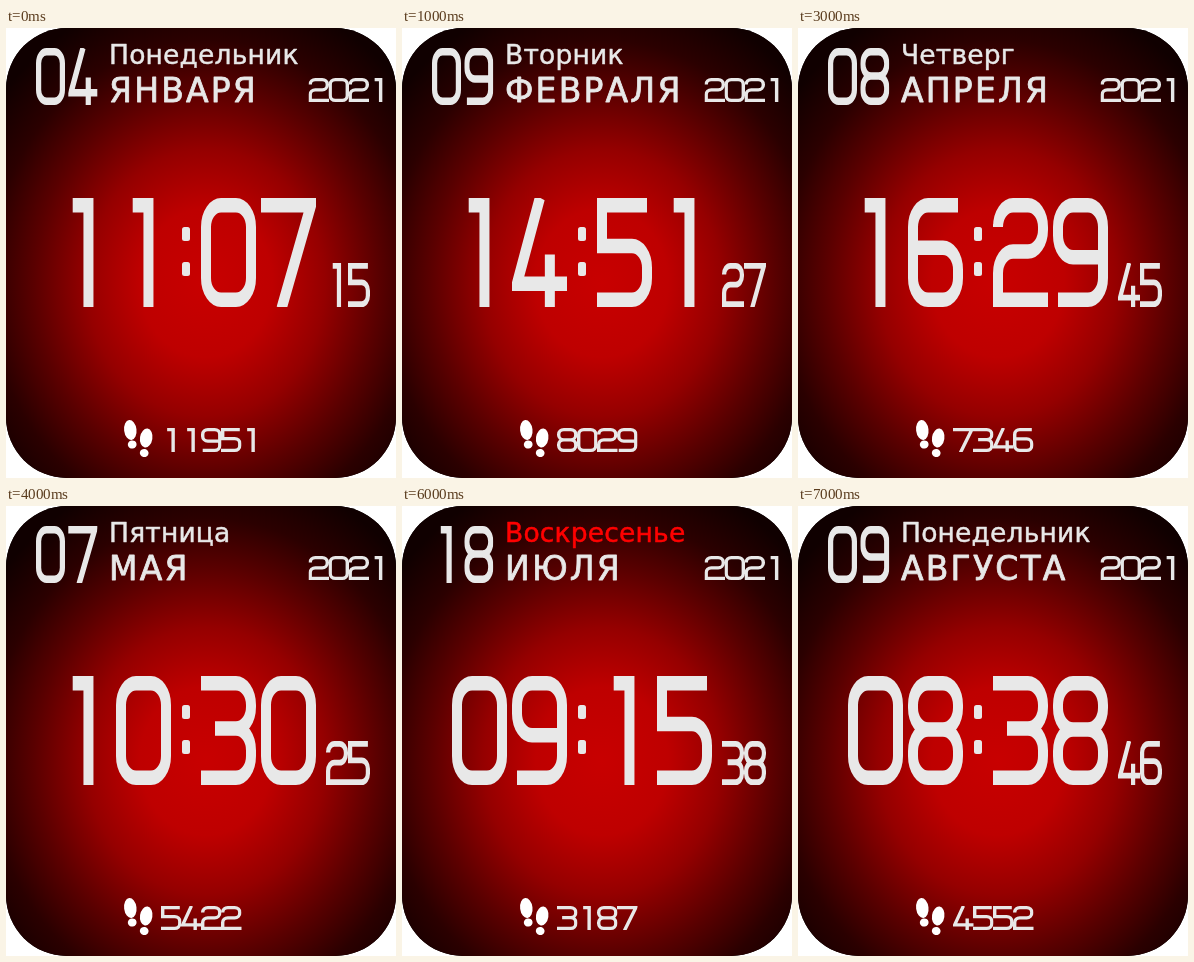
An HTML page with a canvas that plays this animation: 390x450 px, repeating every 8 s.

```html
<!DOCTYPE html>
<html lang="ru">
<head>
<meta charset="utf-8">
<style>
html, body { margin: 0; width: 390px; height: 450px; overflow: hidden; background: #fff; }
canvas { display: block; }
</style>
</head>
<body>
<canvas id="face" width="390" height="450"></canvas>
<script>
const ctx = document.getElementById('face').getContext('2d');
const INK = '#e8e8e8', RED = '#ff0000', STEP_MS = 1000;

// day, weekday, month, hours + minutes, seconds, steps
const screens = [
  ['04', 'Понедельник', 'ЯНВАРЯ', '1107', '15', '11951'],
  ['09', 'Вторник', 'ФЕВРАЛЯ', '1451', '27', '8029'],
  ['03', 'Среда', 'МАРТА', '1804', '35', '9072'],
  ['08', 'Четверг', 'АПРЕЛЯ', '1629', '45', '7346'],
  ['07', 'Пятница', 'МАЯ', '1030', '25', '5422'],
  ['12', 'Суббота', 'ИЮНЯ', '0742', '26', '6665'],
  ['18', 'Воскресенье', 'ИЮЛЯ', '0915', '38', '3187'],
  ['09', 'Понедельник', 'АВГУСТА', '0838', '46', '4552']
];

// Digit sizes; penX is the width of upright strokes, penY of level ones.
const BIG = { w: 55, h: 109, pitch: 60, penX: 10, penY: 14.5 };
const DAY = { w: 29, h: 57, pitch: 32.3, penX: 5.2, penY: 7.5 };
const SECONDS = { w: 22, h: 44, pitch: 22, penX: 4.2, penY: 5.8 };
const WIDE = { w: 20.5, h: 24, pitch: 20, penX: 3.4, penY: 3.2 };

// Unit-box strokes; an "s" after a point keeps its corner sharp.
const glyphs = {
  0: ['.5,0 1,0 1,1 0,1 0,0 .5,0'],
  1: ['.26,0 .61,0s .61,1.2'],
  2: ['0,.2 0,0 1,0 1,.49 0,.49 0,1s 1.2,1'],
  3: ['-.2,0 1,0 1,.48 .2,.48', '.2,.48 1,.48 1,1 -.2,1'],
  4: ['.51,-.08 0,.83s 1.2,.83', '.73,.52 .73,1.2'],
  5: ['1,0 0,0s 0,.43s 1,.43 1,1 -.2,1'],
  6: ['1,0 0,0 0,1 1,1 1,.45 0,.45'],
  7: ['-.2,0 1,0s .34,1.1'],
  8: ['.5,0 1,0 1,.49 0,.49 0,0 .5,0', '.5,.49 1,.49 1,1 0,1 0,.49 .5,.49'],
  9: ['0,1 1,1 1,0 0,0 0,.55 1,.55']
};

const strokes = {};
for (const key in glyphs) {
  strokes[key] = glyphs[key].map(path => path.split(' ').map(point => {
    const [u, v] = point.split(',').map(parseFloat);
    return { u, v, sharp: point.endsWith('s') };
  }));
}

function drawDigit(digit, x, y, { w, h, penX, penY }) {
  // Work in pen units, so one line of width 1 gives both stroke widths.
  const radius = Math.min(w * 0.28 / penX, h * 0.2 / penY);
  const px = p => 0.5 + p.u * (w / penX - 1);
  const py = p => 0.5 + p.v * (h / penY - 1);
  ctx.save();
  ctx.beginPath();
  ctx.rect(x, y, w, h);
  ctx.clip();
  ctx.translate(x, y);
  ctx.scale(penX, penY);
  ctx.beginPath();
  for (const path of strokes[digit]) {
    path.forEach((p, i) => {
      const next = path[i + 1];
      if (i === 0) ctx.moveTo(px(p), py(p));
      else if (!next || p.sharp) ctx.lineTo(px(p), py(p));
      else ctx.arcTo(px(p), py(p), px(next), py(next), radius);
    });
  }
  ctx.lineWidth = 1;
  ctx.strokeStyle = INK;
  ctx.stroke();
  ctx.restore();
}

function drawNumber(text, x, y, style) {
  [...text].forEach((digit, i) => drawDigit(digit, x + i * style.pitch, y, style));
}

function drawText(text, x, y, size, spacing, weight, color) {
  ctx.font = `${size}px "DejaVu Sans", sans-serif`;
  ctx.letterSpacing = spacing + 'px';
  ctx.fillStyle = ctx.strokeStyle = color;
  ctx.lineWidth = weight;
  ctx.lineJoin = 'round';
  ctx.fillText(text, x, y);
  ctx.strokeText(text, x, y);
  ctx.lineJoin = 'miter';
}

function roundBox(x, y, w, h, r, fill) {
  ctx.beginPath();
  ctx.roundRect(x, y, w, h, r);
  ctx.fillStyle = fill;
  ctx.fill();
}

function drawBackground() {
  ctx.fillStyle = '#fff';
  ctx.fillRect(0, 0, 390, 450);
  roundBox(0, 0, 390, 450, 61, '#000');
  ctx.save();
  ctx.clip();
  ctx.translate(200, 255);
  ctx.scale(1, 1.12);
  const glow = ctx.createRadialGradient(0, 0, 0, 0, 0, 265);
  glow.addColorStop(0, '#c80000');
  glow.addColorStop(0.25, '#be0000');
  glow.addColorStop(0.45, '#950000');
  glow.addColorStop(0.65, '#5a0000');
  glow.addColorStop(0.82, '#2b0000');
  glow.addColorStop(1, '#100000');
  ctx.fillStyle = glow;
  ctx.fillRect(-200, -255, 390, 450);
  ctx.restore();
}

function ellipse(x, y, rx, ry, tilt) {
  ctx.beginPath();
  ctx.ellipse(x, y, rx, ry, tilt, 0, Math.PI * 2);
  ctx.fill();
}

function drawFootprints() {
  ctx.fillStyle = '#fff';
  ellipse(124.3, 402, 6.2, 10, -0.12);
  ellipse(126.2, 416.5, 4.4, 4, -0.2);
  ellipse(140.2, 410, 6.2, 9.6, 0.15);
  ellipse(138.2, 425, 4.4, 4, 0.25);
}

function draw(now) {
  const index = Math.floor(now / STEP_MS) % screens.length;
  const [day, weekday, month, time, seconds, steps] = screens[index];
  const weekend = weekday === 'Суббота' || weekday === 'Воскресенье';

  drawBackground();
  drawNumber(day, 30, 20, DAY);
  drawText(weekday, 103, 35.5, 26.5, 0.2, 0.5, weekend ? RED : INK);
  drawText(month, 103, 74, 33, 2.2, 0.8, INK);
  drawNumber('2021', 302.5, 50, WIDE);

  drawNumber(time.slice(0, 2), 50, 170, BIG);
  drawNumber(time.slice(2), 195, 170, BIG);
  roundBox(176, 199, 8, 14, 2.5, INK);
  roundBox(176, 234, 8, 14, 2.5, INK);
  drawNumber(seconds, 320, 235, SECONDS);

  drawFootprints();
  drawNumber(steps, 155, 400, WIDE);
}

let start;
function tick(now) {
  start ??= now;
  draw(now - start);
  requestAnimationFrame(tick);
}
draw(0);
requestAnimationFrame(tick);
</script>
</body>
</html>
```
